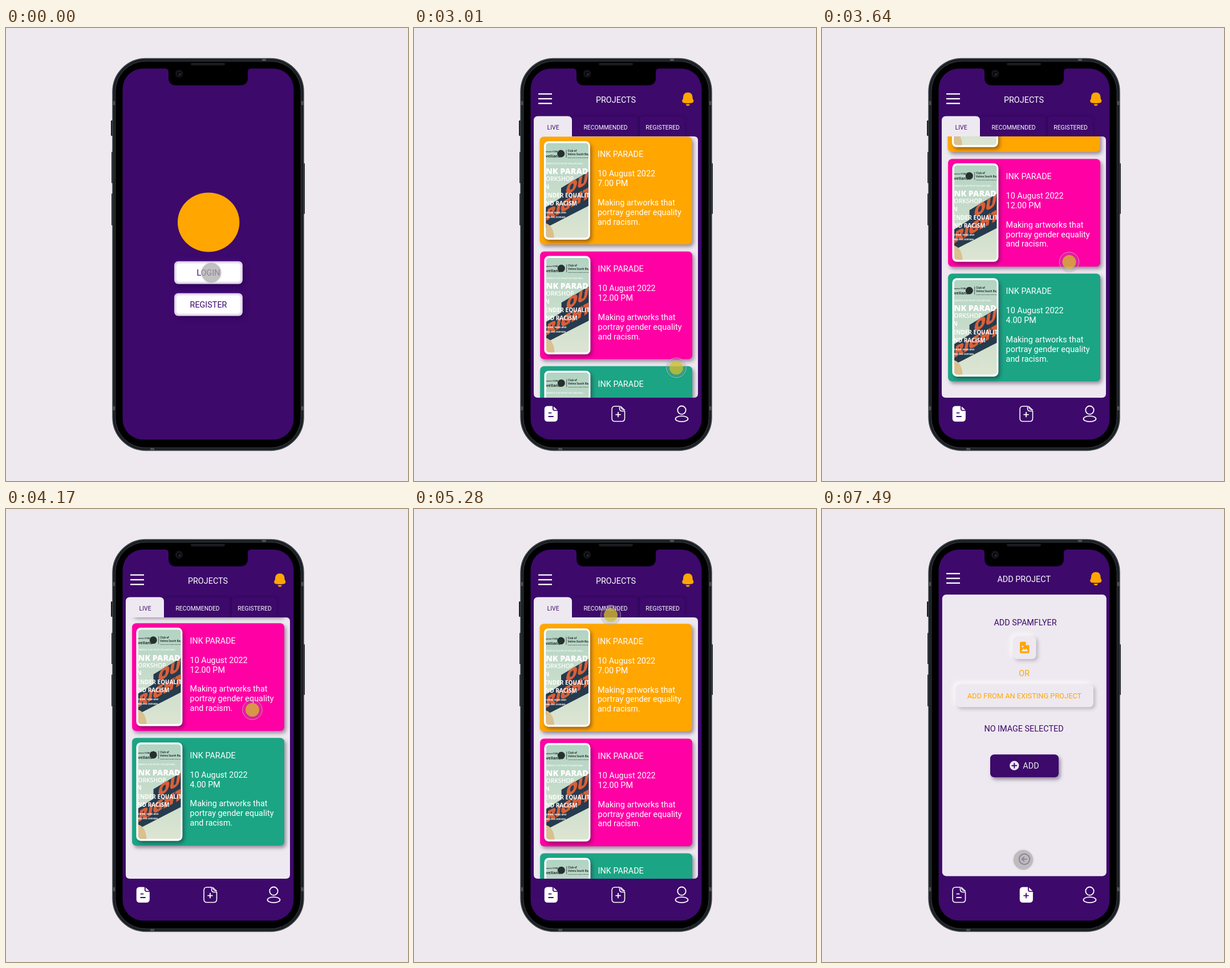
Animation, 705 px wide and 794 px high, one loop 8000 ms. Source, as an HTML page:

```html
<!DOCTYPE html>
<html lang="en">
<head>
<meta charset="utf-8">
<title>Projects app</title>
<style>
html, body { margin: 0; width: 100%; height: 100%; overflow: hidden; background: #eee8ef; }
svg { display: block; width: 705px; height: 794px; font-family: Roboto, Arial, sans-serif; }
.card { filter: drop-shadow(3px 4px 3px rgba(30, 10, 40, .42)); }
.glow { filter: drop-shadow(2px 3px 4px rgba(20, 0, 50, .55)) drop-shadow(-2px -2px 4px rgba(95, 15, 170, .45)); }
.soft { filter: drop-shadow(3px 3px 3px rgba(90, 75, 105, .36)) drop-shadow(-4px -4px 5px rgba(255, 255, 255, .8)); }
.tab { filter: drop-shadow(0 0 2px rgba(20, 0, 45, .5)); }
.poster { font-family: "Open Sans", Inter, sans-serif; font-weight: 700; fill: #fff; }
</style>
</head>
<body>
<svg id="stage" viewBox="0 0 705 794"></svg>
<script>
const PURPLE = '#3d096b', PANEL = '#eee9f0', ORANGE = '#ffa600', GREY = '#b3b1b4';
const stage = document.getElementById('stage');

const text = (x, cy, str, fill = '#fff', size = 14.4, anchor = 'middle') =>
  `<text x="${x}" y="${cy + size * .356}" font-size="${size}" fill="${fill}" text-anchor="${anchor}">${str}</text>`;
const rect = (x, y, w, h, r, fill, more = '') =>
  `<rect x="${x}" y="${y}" width="${w}" height="${h}" rx="${r}" fill="${fill}" ${more}/>`;
const line = (d, color, width = 2) =>
  `<path d="${d}" fill="none" stroke="${color}" stroke-width="${width}" stroke-linecap="round" stroke-linejoin="round"/>`;
const group = (id, body, more = '') => `<g id="${id}" ${more}>${body}</g>`;

// Phone

const phone = () => {
  const sides = [[184, 162, 27], [185, 217, 55], [185, 290, 56], [520.5, 237, 89]]
    .map(([x, y, h]) => rect(x, y, 3.5, h, 1.2, '#1c2126')).join('');
  const bands = [[187.5, 128], [517, 128], [187.5, 663], [517, 663]]
    .map(([x, y]) => rect(x, y, 5, 7, 0, '#4b4f54')).join('') +
    rect(449, 53.5, 7, 5, 0, '#4b4f54') + rect(253, 735, 7, 5, 0, '#4b4f54');
  return sides +
    rect(187, 53.5, 335, 687, 58, '#23282c', 'stroke="#3d4348" stroke-width="1.4"') +
    rect(189.5, 56, 330, 682, 55.5, 'none', 'stroke="#15191c" stroke-width="1.5"') + bands +
    rect(191.8, 58.2, 325.4, 677.6, 53, '#000', 'stroke="#33383c"') +
    rect(204.5, 71, 300, 650.5, 36, PURPLE);
};

const notch = () =>
  `<path d="M279 70H430V71Q424 71 424 77V87Q424 100.500 410.500 100.500H298.500Q285 100.500 285 87V77Q285 71 279 71Z"/>` +
  rect(324, 61, 60, 4.6, 2.3, '#1b1c1f') +
  `<circle cx="303.500" cy="80" r="7" fill="#101115"/>
   <circle cx="303.500" cy="80" r="4.300" fill="#08090d" stroke="#23242c"/>
   <circle cx="304.500" cy="81" r="1.500" fill="#34374a"/>`;

// Entry screens

const whiteButton = (y, label) =>
  `<g class="glow">${rect(295, y, 120, 40, 7, '#d9cbe3')}</g>` +
  rect(298, y + 3, 114, 34, 5, '#fff', 'filter="url(#blur)"') + text(355, y + 20.5, label, PURPLE);
const field = (x, y, w, label, cx, cy) => rect(x, y, w, 40, 7, '#fff') + text(cx, cy, label, GREY);

const welcome = () => `<ellipse cx="355.200" cy="340.500" rx="54.200" ry="52" fill="${ORANGE}"/>` +
  whiteButton(408.8, 'LOGIN') + whiteButton(464.8, 'REGISTER');
const loginForm = () => field(235, 288, 240, 'USERNAME', 355, 308.5) +
  field(235, 349, 240, 'PASSWORD', 355, 369.5) + whiteButton(458, 'LOGIN');

// Header and navigation

const header = () =>
  [115.6, 124, 132.2].map(y => `<path d="M218 ${y}h24" stroke="#fff" stroke-width="2.300"/>`).join('') +
  `<path d="M480.300 113c5 0 8.200 3.500 8.200 8.200 0 2 .3 3 1.300 4.600 1.400 2.600.2 5.400-3.300 5.800q-6.200.7-12.400 0c-3.500-.4-4.700-3.200-3.300-5.800 1-1.600 1.300-2.600 1.300-4.600 0-4.700 3.200-8.200 8.200-8.200z" fill="${ORANGE}"/>
   <path d="M476.500 133.400h7.400q-.8 3-3.700 3t-3.700-3z" fill="${ORANGE}"/>`;

const docIcon = (x, mark, filled) => {
  const sheet = 'M6.300 1H14.500V5Q14.500 9.500 19 9.500H23.500V22.300Q23.500 27.500 18.300 27.500H6.300Q1.100 27.500 1.100 22.300V6.200Q1.100 1 6.300 1Z';
  const body = filled
    ? `<path d="${sheet}" fill="#fff" stroke="#fff" stroke-width=".8"/><path d="M16.800 1.200L23.400 7.400H19Q16.800 7.400 16.800 5.200Z" fill="#fff"/>`
    : line(sheet, '#fff', 1.6) + line('M16.500 1.200Q17 7 23.300 7.600Z', '#fff', 1.4);
  return `<g transform="translate(${x} 662)">${body}${line(mark, filled ? PURPLE : '#fff', 1.8)}</g>`;
};
const LINES = 'M8.500 12.700H12.500M8.200 19H16', PLUS = 'M12 11.700V19.500M8.100 15.600H15.900';
const nav = adding => docIcon(228, LINES, !adding) + docIcon(346, PLUS, adding);
const profile = () => `<g fill="none" stroke="#fff" stroke-width="1.800">
  <circle cx="469.500" cy="669.700" r="7.200"/><ellipse cx="469.500" cy="685" rx="11" ry="4.900"/></g>`;

// Project list

const tab = (x, w, label, on) =>
  `<path ${on ? '' : 'class="tab"'} d="M${x} 191V162Q${x} 154.500 ${x + 7.5} 154.500H${x + w - 7.5}Q${x + w} 154.500 ${x + w} 162V191Z" fill="${on ? PANEL : PURPLE}"/>` +
  text(x + w / 2 + .6, 174.3, label, on ? PURPLE : '#fff', 10.4);
const tabs = active =>
  [[210, 67, 'LIVE'], [277.5, 116, 'RECOMMENDED'], [395.5, 80, 'REGISTERED']]
    .map(([x, w, label], i) => [i === active, tab(x, w, label, i === active)])
    .sort((a, b) => a[0] - b[0]).map(a => a[1]).join('');

// Drawn in the coordinates of the first card
const poster = () => {
  const put = (x, y, size, str, more = '') => `<text x="${x}" y="${y}" font-size="${size}" ${more}>${str}</text>`;
  const sign = (x, y, str) => `<text transform="translate(${x} ${y}) skewY(-28) skewX(-10)" font-size="25"
    font-weight="800" fill="#d8603a" stroke="#d8603a">${str}</text>`;
  const dark = 'fill="#26302f"';
  return `<g class="card">${rect(227.8, 209.2, 81, 172.5, 8, '#fff')}</g>
    <g clip-path="url(#posterClip)" class="poster">
      ${rect(231, 212, 75.5, 167, 0, 'url(#mint)')}
      <path d="M258 291L307 262V322L231 361V325L258 308Z" fill="#263b4e"/>
      ${sign(265, 304, 'OUR')}${sign(230, 349, 'RIGHT')}
      <path d="M231 353q14 4 15 27h-15z" fill="#d9c08e"/>
      ${put(231, 229, 4, 'strict 5108', dark)}${put(231, 238, 7, 'vellane', dark)}
      <circle cx="257.700" cy="231" r="6.500" fill="#26302f"/>
      <path d="M267 224v14" stroke="#26302f" stroke-width=".7"/>
      ${put(269.5, 228, 4.5, 'Club of', dark)}${put(269.5, 234, 4.5, 'Velmo South Bay', dark)}
      ${put(269.5, 239, 2.4, 'Vellan Club of Velmo South Bay', dark)}
      ${put(232, 249.5, 4, 'MARCH 4:30 PM AT VELLAN HALL', 'opacity=".8"')}
      ${put(231, 267, 14.2, 'NK PARADE', 'font-weight="800"')}
      ${put(231, 279, 10.3, 'ORKSHOP', 'font-weight="600"')}${put(229, 292.5, 10.3, 'N')}
      ${put(229, 308, 10, 'ENDER EQUALITY')}${put(230, 322, 10, 'ND RACISM')}
      ${put(231, 336, 4, 'ORVIN TASKE AND')}${put(231, 343.7, 4, 'MELISSE DORVAN')}
    </g>`;
};

const card = (x, y, color, time) => {
  const rows = ['INK PARADE', '', '10 August 2022', time, '', 'Making artworks that', 'portray gender equality', 'and racism.'];
  return `<g transform="translate(${x} ${y})"><g class="card">${rect(220.5, 201.3, 267, 188.8, 7, color)}</g>${poster()}` +
    rows.map((row, i) => text(322, 232 + i * 16.88, row, '#fff', 14.4, 'start')).join('') + '</g>';
};

const list = () =>
  `<g id="liveTabs">${tabs(0)}</g><g id="recTabs">${tabs(1)}</g>
   <path id="panel" d="M210 190H491Q498 190 498 197V641Q498 648 491 648H217Q210 648 210 641Z" fill="${PANEL}"/>
   <g clip-path="url(#listClip)">${group('cards',
    card(0, 0, ORANGE, '7.00 PM') + card(.6, 201.1, '#ff00a4', '12.00 PM') + card(.6, 402.2, '#1ba584', '4.00 PM'))}</g>` +
  text(354, 125.5, 'PROJECTS');

// Add project

const arrow = dir => `<circle cx="355" cy="613.800" r="9.200" fill="none" stroke="${PURPLE}" stroke-width="2.100"/>` +
  line(`M${355 - 4.3 * dir} 613.800H${355 + 4 * dir}M${355 + .6 * dir} 610l${3.8 * dir} 3.800l${-3.8 * dir} 3.800`, PURPLE, 2);

const details = () => rect(210.8, 152.2, 288, 493.6, 7, PANEL) +
  field(234.8, 175.5, 240.5, 'PROJECT NAME', 355.7, 198.3) +
  field(235.6, 235.5, 240.5, 'AVENUE', 361, 254.8) +
  field(234.8, 297.2, 72, 'FROM', 271, 323) + field(319.8, 297.2, 72, 'TO', 354.7, 323.6) +
  field(401.4, 297.2, 72, 'TIME', 435.2, 317.3) +
  text(271.5, 309, 'DATE', GREY, 7.6) + text(355.5, 309.8, 'DATE', GREY, 7.6) +
  field(234, 358.2, 240.5, 'VENUE', 354.2, 379) +
  field(235.6, 419.2, 240.5, 'PCP', 355.8, 440) +
  field(235.6, 480, 240.5, 'DESCRIPTION', 355.8, 501) +
  field(234, 541, 240.5, 'LINK', 354.4, 562) + arrow(1);

const image = () => rect(210.8, 150, 288, 493.4, 7, PANEL) +
  text(356.5, 198.5, 'ADD SPAMFLYER', PURPLE) +
  `<g class="soft">${rect(335, 223, 40.5, 40, 7, PANEL)}</g>
   <path d="M349 232.800h8.500l6 6v12q0 2-2 2h-12.500q-2 0-2-2v-16q0-2 2-2z" fill="${ORANGE}"/>
   <path d="M357.500 232.800v6h6M349.500 249.500l4-5 2.500 2.500 2-2.500 3.500 5z" fill="${PANEL}"/>
   <circle cx="351.800" cy="241" r="1.500" fill="${PANEL}"/>` +
  text(354.7, 287.5, 'OR', ORANGE) +
  `<g class="soft">${rect(235, 307.3, 241, 40, 7, PANEL)}</g>` +
  text(355, 327.5, 'ADD FROM AN EXISTING PROJECT', ORANGE, 12.8) +
  text(354, 384.5, 'NO IMAGE SELECTED', PURPLE) +
  `<g class="card">${rect(295, 430.2, 120, 40, 7, PURPLE)}</g>
   <circle cx="337.300" cy="449.800" r="8.200" fill="${PANEL}"/>` +
  line('M337.300 445.800v8M333.300 449.800h8', PURPLE, 1.9) + text(366.5, 450.3, 'ADD', PANEL) + arrow(-1);

stage.innerHTML = `<defs>
  <filter id="blur" x="-10%" y="-20%" width="120%" height="140%"><feGaussianBlur stdDeviation="1.800"/></filter>
  <linearGradient id="mint" x2="0" y2="1"><stop stop-color="#b2d3c3"/><stop offset="1" stop-color="#dde5d2"/></linearGradient>
  <clipPath id="posterClip">${rect(231.3, 212.6, 74.6, 165.6, 5, '#000')}</clipPath>
  <clipPath id="listClip">${rect(210, 190, 288, 458, 7, '#000')}</clipPath></defs>` +
  phone() + group('welcome', welcome()) + group('loginForm', loginForm()) +
  group('chrome', group('header', header()) + group('listNav', nav(false)) + group('addNav', nav(true)) + profile()) +
  group('list', list()) + group('addTitle', text(354.2, 123.2, 'ADD PROJECT')) +
  group('details', details()) + group('image', image()) + notch() +
  group('cursor', `<circle id="ring" r="17.300" stroke-width=".8" style="filter:drop-shadow(0 .5px 1px rgba(0,0,0,.3))"/><circle id="dot"/>`);

// Motion: rows of [time, values...], joined by a curve that never overshoots

const POINTER = [
  [0, 360, 429], [420, 360, 429], [810, 386, 478], [1640, 386, 478], [1810, 448.5, 490], [2010, 524.5, 530],
  [2450, 464, 609.5], [2890, 464, 609.5], [3330, 439, 500], [3710, 433, 395], [4020, 432, 351], [4150, 432, 350],
  [4600, 442, 652], [4640, 442, 651.5], [4820, 436.5, 177], [5040, 436.5, 177], [5240, 345, 186], [6279, 345, 186],
  [6280, 360.5, 682], [6550, 360.5, 682], [6920, 436, 682], [7149, 436, 682], [7150, 353, 615], [8000, 353, 615]];
const SCROLL = [[0, 0], [2900, 0], [3330, -94], [3710, -183], [4020, -202.7], [4160, -202.7], [4590, 30], [4640, 26.7], [4820, 0], [8000, 0]];
const PRESS = [[0, 0], [890, 0], [940, 1], [1449, 1], [1450, 0], [2480, 0], [2550, 1], [4590, 1], [4630, 0],
  [5220, 0], [5280, 1], [5639, 1], [5640, 0], [8000, 0]];

function at(keys, t, k = 1) {
  const i = Math.max(0, keys.findIndex(row => row[0] > t) - 1);
  const slope = j => j < 0 || j > keys.length - 2 ? 0 : (keys[j + 1][k] - keys[j][k]) / (keys[j + 1][0] - keys[j][0]);
  const tangent = j => {
    const a = slope(j - 1), b = slope(j);
    return a * b > 0 ? 2 * a * b / (a + b) : 0;
  };
  const [a, b] = [keys[i], keys[i + 1]], h = b[0] - a[0], u = (t - a[0]) / h;
  const s = u * u * (3 - 2 * u);
  return a[k] + (b[k] - a[k]) * s + h * u * (1 - u) * (tangent(i) * (1 - u) - tangent(i + 1) * u);
}

const $ = Object.fromEntries([...stage.querySelectorAll('[id]')].map(el => [el.id, el]));
const show = (id, alpha) => {
  $[id].style.display = alpha > 0 ? '' : 'none';
  $[id].setAttribute('opacity', +alpha);
};
const fade = (t, from, to) => {
  const u = Math.min(1, Math.max(0, (t - from) / (to - from)));
  return 1 - (1 - u) ** 2;
};

function draw(t) {
  const inside = t >= 1370, adding = t >= 6280, live = t < 5560;
  const entry = fade(t, 80, 400), next = fade(t, 7130, 7470);
  show('welcome', inside ? 0 : 1 - entry);
  show('loginForm', inside ? 0 : entry);
  show('chrome', inside);
  show('list', inside && !adding);
  show('listNav', !adding);
  show('addNav', adding);
  show('addTitle', adding);
  show('details', adding && next < 1);
  show('image', adding ? next : 0);
  show('liveTabs', live);
  show('recTabs', !live);
  $.header.setAttribute('transform', `translate(0 ${adding ? -2.4 : 0})`);
  $.cards.setAttribute('transform', `translate(0 ${at(SCROLL, t)})`);

  const p = at(PRESS, t), mix = (a, b) => a + (b - a) * p;
  $.cursor.setAttribute('transform', `translate(${at(POINTER, t, 1)} ${at(POINTER, t, 2)})`);
  $.ring.setAttribute('fill', `rgba(174,174,174,${.18 * p})`);
  $.ring.setAttribute('stroke', `rgba(215,208,215,${mix(.75, .85)})`);
  $.dot.setAttribute('r', mix(17, 12));
  $.dot.setAttribute('fill', `rgba(${mix(174, 211)},${mix(174, 192)},${mix(174, 44)},.745)`);
}

function tick(now) {
  draw(now % 8000);
  requestAnimationFrame(tick);
}
draw(0);
requestAnimationFrame(tick);
</script>
</body>
</html>
```
